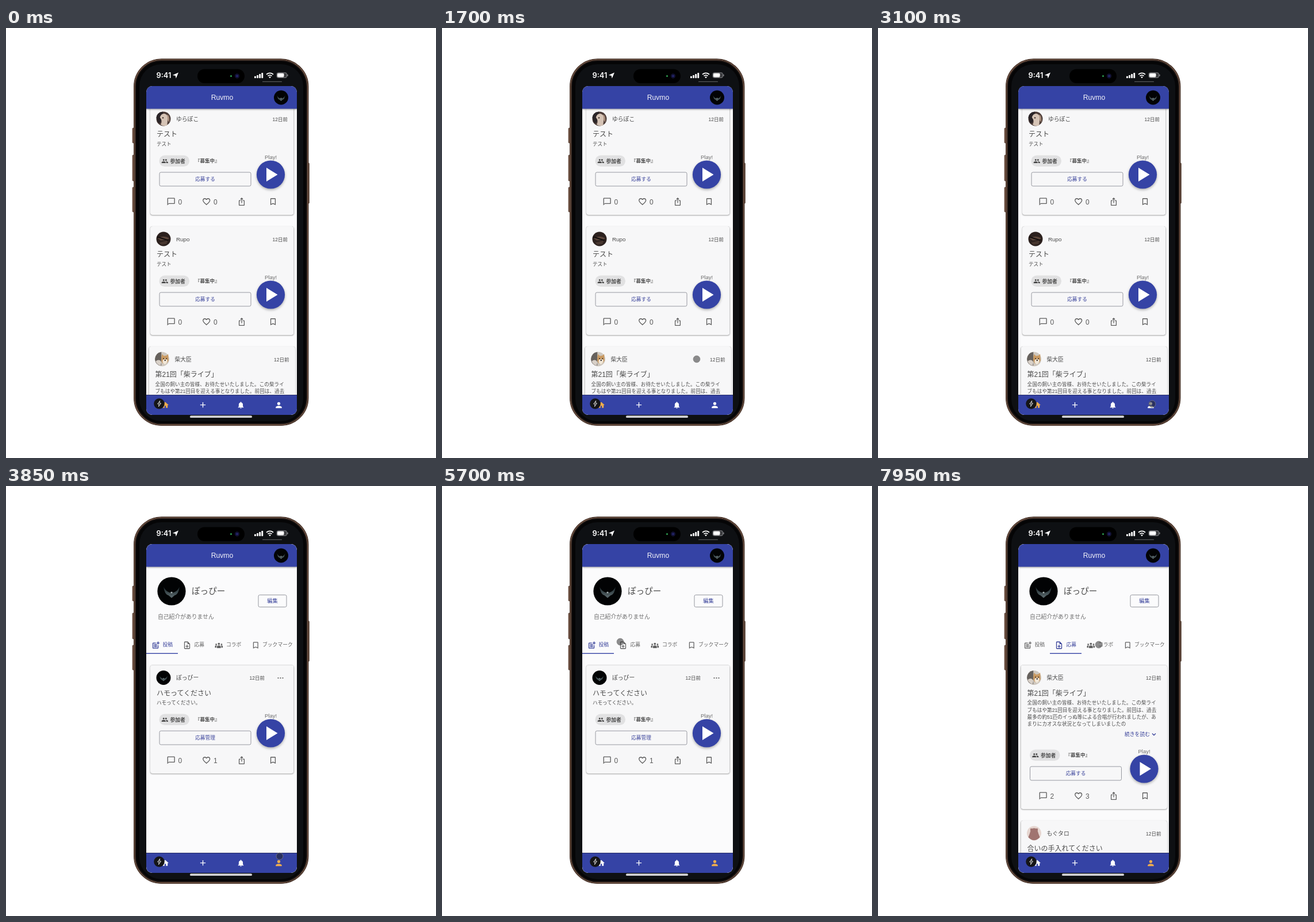
Recreate the animation shown at these times as an HTML page. Size 748 by 748 pixels, loop 8 s.

```html
<!DOCTYPE html>
<html lang="ja">
<head>
<meta charset="utf-8">
<title>Phone demo</title>
<style>
html, body { margin: 0; width: 100%; height: 100%; overflow: hidden; background: #fff; }
svg { display: block; width: 100vw; height: 100vh; }
text { font-family: "Liberation Sans", "Noto Sans CJK JP", sans-serif; white-space: pre; }
.home, .profile, .posts, .applied, .to-accent, .from-accent, .home-icon, .user-icon {
  animation: 8s step-end infinite;
}
.home { animation-name: leave-home; }
.profile { animation-name: enter-profile; }
.posts { animation-name: leave-posts; }
.applied { animation-name: enter-applied; }
.from-accent { animation-name: tab-off; }
.to-accent { animation-name: tab-on; }
.home-icon { animation-name: home-off; }
.user-icon { animation-name: user-on; }
.bar { animation: slide 8s linear infinite; }
.pointer { animation: point 8s ease-in-out infinite; }
.card { filter: drop-shadow(0 0 .7px rgba(0,0,0,.35)) drop-shadow(0 1px 1.2px rgba(0,0,0,.36)); }
.play { filter: drop-shadow(0 2px 2px rgba(0,0,0,.3)); }
.head { filter: drop-shadow(0 1px 1.5px rgba(0,0,0,.4)); }
@keyframes leave-home { 0% { visibility: visible } 41.9%, 100% { visibility: hidden } }
@keyframes enter-profile { 0% { opacity: 0 } 41.9%, 100% { opacity: 1 } }
@keyframes leave-posts { 0% { visibility: visible } 78.8%, 100% { visibility: hidden } }
@keyframes enter-applied { 0% { visibility: hidden } 78.8%, 100% { visibility: visible } }
@keyframes tab-off { 0% { color: #39429a } 78.8%, 100% { color: #636363 } }
@keyframes tab-on { 0% { color: #636363 } 78.8%, 100% { color: #39429a } }
@keyframes home-off { 0% { color: #f0ad4e } 41.9%, 100% { color: #fff } }
@keyframes user-on { 0% { color: #fff } 41.9%, 100% { color: #f0ad4e } }
@keyframes slide {
  0% { transform: none }
  78.8% { transform: none; animation-timing-function: cubic-bezier(.4,0,.2,1) }
  82.6%, 100% { transform: translateX(55px) }
}
@keyframes point {
  0%, 18.5% { transform: translate(441px,566px); opacity: 0 }
  19.8% { transform: translate(442px,571px); opacity: 1 }
  21.25% { transform: translate(443px,576px) }
  32% { transform: translate(475px,651px) }
  37%, 42% { transform: translate(477px,654px) }
  48.1%, 66.9% { transform: translate(476px,644px) }
  71.25% { transform: translate(310px,271px) }
  76.25%, 87% { transform: translate(324px,275px) }
  95.5%, 100% { transform: translate(384px,276px); opacity: 1 }
}
</style>
</head>
<body>
<svg id="stage" viewBox="0 0 748 748"></svg>
<script>
const BLUE = '#3543a5', INK = '#39429a', GREY = '#5c5c5c', DARK = '#4a4a4a';

const ICON = {
  chat: 'M20 2H4c-1.1 0-2 .9-2 2v18l4-4h14c1.1 0 2-.9 2-2V4c0-1.1-.9-2-2-2zm0 14H6l-2 2V4h16v12z',
  heart: 'M16.5 3c-1.74 0-3.41.81-4.5 2.09C10.91 3.81 9.24 3 7.5 3 4.42 3 2 5.42 2 8.5c0 3.78 3.4 6.86 8.55 11.54L12 21.35l1.45-1.32C18.6 15.36 22 12.28 22 8.5 22 5.42 19.58 3 16.5 3zm-4.4 15.55l-.1.1-.1-.1C7.14 14.24 4 11.39 4 8.5 4 6.5 5.5 5 7.5 5c1.54 0 3.04.99 3.57 2.36h1.87C13.46 5.99 14.96 5 16.5 5c2 0 3.5 1.5 3.5 3.5 0 2.89-3.14 5.74-7.9 10.05z',
  share: 'M16 5l-1.42 1.42-1.59-1.59V16h-1.98V4.83L9.42 6.42 8 5l4-4 4 4zm4 5v11c0 1.1-.9 2-2 2H6c-1.11 0-2-.9-2-2V10c0-1.11.89-2 2-2h3v2H6v11h12V10h-3V8h3c1.1 0 2 .89 2 2z',
  mark: 'M17 3H7c-1.1 0-2 .9-2 2v16l7-3 7 3V5c0-1.1-.9-2-2-2zm0 15l-5-2.18L7 18V5h10v13z',
  pair: 'M16 11a3 3 0 1 0 0-6 3 3 0 0 0 0 6zM8 11a3 3 0 1 0 0-6 3 3 0 0 0 0 6zm0 2c-2.33 0-7 1.17-7 3.5V19h14v-2.5c0-2.33-4.67-3.5-7-3.5zm8 0-1 .05c1.16.84 2 1.97 2 3.45V19h6v-2.5c0-2.33-4.67-3.5-7-3.5z',
  crowd: 'M12 11a3 3 0 1 0 0-6 3 3 0 0 0 0 6zM4.5 12a2.3 2.3 0 1 0 0-4.6 2.3 2.3 0 0 0 0 4.6zM19.5 12a2.3 2.3 0 1 0 0-4.6 2.3 2.3 0 0 0 0 4.6zM6.5 20v-4c0-5 11-5 11 0v4zM1 19v-4q0-3 5-2.5-1 2-1 6.5zM23 19v-4q0-3-5-2.5 1 2 1 6.5z',
  post: 'M17 19H5V7h7V5H5c-1.1 0-2 .9-2 2v12c0 1.1.9 2 2 2h12c1.1 0 2-.9 2-2v-7h-2zM19 2h-2v3h-3v2h3v3h2V7h3V5h-3zM7 9h8v2H7zM7 12h8v2H7zM7 15h8v2H7z',
  file: 'M14 2H6c-1.1 0-2 .9-2 2v16c0 1.1.9 2 2 2h12c1.1 0 2-.9 2-2V8zm4 18H6V4h7v5h5zM11 11h2v3h3v2h-3v3h-2v-3H8v-2h3z',
  house: 'M10 20v-6h4v6h5v-8h3L12 3 2 12h3v8z',
  plus: 'M19 13h-6v6h-2v-6H5v-2h6V5h2v6h6z',
  bell: 'M12 22c1.1 0 2-.9 2-2h-4c0 1.1.89 2 2 2zm6-6v-5c0-3.07-1.64-5.64-4.5-6.32V4c0-.83-.67-1.5-1.5-1.5s-1.5.67-1.5 1.5v.68C7.63 5.36 6 7.92 6 11v5l-2 2v1h16v-1z',
  user: 'M12 12a4 4 0 1 0 0-8 4 4 0 0 0 0 8zm0 2c-2.67 0-8 1.34-8 4v2h16v-2c0-2.66-5.33-4-8-4z'
};

const rect = (x, y, w, h, r, fill, more = '') =>
  `<rect x="${x}" y="${y}" width="${w}" height="${h}" rx="${r}" fill="${fill}" ${more}/>`;
const circle = (x, y, r, fill, more = '') =>
  `<circle cx="${x}" cy="${y}" r="${r}" fill="${fill}" ${more}/>`;
const path = (d, fill, more = '') => `<path d="${d}" fill="${fill}" ${more}/>`;
const stroke = (color, width) => `stroke="${color}" stroke-width="${width}"`;
const icon = (name, x, y, s, fill = GREY) =>
  path(ICON[name], fill, `transform="translate(${x - 12 * s} ${y - 12 * s}) scale(${s})"`);
// y is the vertical middle of the line
const text = (s, x, y, size, fill = GREY, more = '') =>
  `<text x="${x}" y="${y + size * .38}" font-size="${size}" fill="${fill}" ${more}>${s}</text>`;
const MID = 'text-anchor="middle"', END = 'text-anchor="end"', BOLD = 'font-weight="700"';
const outline = (x, y, w, h) => rect(x, y, w, h, 2.5, 'none', stroke('#8c8e96', .9));

// Avatars live in a unit circle
const FACES = {
  pale: circle(0, 0, 1, '#4a3a36') + path('M-1-.2Q-.9-.9-.1-1L0-.3-.5.6-.8.5z', '#2a2427') +
    path('M-.5-.2Q-.3-.8.2-.7.7-.5.6 0L.5.9Q0 1.1-.4.8-.1.3-.5-.2z', '#d5c3b5') +
    path('M.5-.6Q.9-.5.8.5L.6.2z', '#a88d7c') + circle(-.08, -.15, .1, '#4b3c37'),
  dark: circle(0, 0, 1, '#2c211e') + path('M-.8-.1Q0-.6.8-.1L.5.1-.4.2z', '#5c463b') +
    path('M-.6.5L.6.2.4.7-.3.8z', '#47362f') + path('M-.9-.3L.7.2', 'none', stroke('#120e0d', .16)),
  shiba: circle(0, 0, 1, '#cfc8bf') + path('M-1 0Q-.9-.9-.1-1L-.1.9Q-.9.9-1 0z', '#66615d') +
    path('M-.9.3Q-.4-.1-.1.4L-.2.9Q-.7.8-.9.3z', '#d8d0c8') +
    path('M0-.7L.25-.45.6-.5.85-.7.9.2Q.6.8.1.6-.3.2 0-.7z', '#c99a62') +
    path('M.1.15Q.4-.2.75.15.7.7.3.7 0 .5.1.15z', '#f1e8da') +
    circle(.2, -.08, .08, '#332a26') + circle(.62, -.08, .08, '#332a26') + circle(.42, .15, .1, '#332a26'),
  brown: circle(0, 0, 1, '#e6d6d0') +
    path('M-.8.55Q-.6.1-.5-.3-.6-.8-.3-.65 0-.75.3-.65.6-.8.5-.3.6.1.8.55 0 1.4-.8.55z', '#a07470'),
  night: circle(0, 0, 1, '#020304') +
    path('M-.56-.3Q-.4.05-.1.1L0 .2.1.1Q.4.05.56-.3.5.25.2.3L0 .48-.2.3Q-.5.25-.56-.3z', 'url(#glow)') +
    circle(0, .1, .07, '#9aa6a8')
};
const avatar = (kind, x, y, r) => `<g transform="translate(${x} ${y}) scale(${r})">${FACES[kind]}</g>`;

function card(top, height, o) {
  const d = o.wide ? 2.5 : 0, left = 262 - d, right = 490 + d, low = top + height;
  const body = o.body.map((line, i) =>
    text(line, left, top + 65.7 + i * 12.1, 8.55, DARK, o.wide ? 'letter-spacing=".08"' : ''));
  const more = o.body.length > 2
    ? text('続きを読む', 429, top + 120.5, 8.8, INK) +
      path(`M477 ${top + 119}l3 3 3-3`, 'none', stroke(INK, 1.3)) : '';
  const dots = o.menu ? [473.5, 477.5, 481.5].map(x => circle(x, top + 22.5, 1.1, GREY)).join('') : '';
  return `<g class="card">${rect(251 - d, top, 249.5 + 2 * d, height, 4, '#f7f7f8')}</g>` +
    avatar(o.face, 274 - d, top + 22, 12.5) +
    text(o.name, 296 - d, top + 22, 9.8, DARK) +
    text('12日前', o.menu ? 450 : right, top + 22.7, 8.5, DARK, END) + dots +
    text(o.title, left, top + 48.6, 12, DARK) + body.join('') + more +
    rect(266.5 - d, low - 103.5, 52.5, 19.5, 9.7, '#e1e1e2') +
    icon('pair', 276.3 - d, low - 93.5, .51, DARK) +
    text('参加者', 285.5 - d, low - 93.8, 8.8, DARK, BOLD) +
    text('『募集中』', 329 - d, low - 93.8, 8.5, DARK, BOLD) +
    outline(267 - d, low - 74, 159, 24) +
    text(o.action, 346.5 - d, low - 62.2, 8.7, INK, MID) +
    text('Play!', 460.5 + d, low - 100.5, 9.5, '#6c6c6c', MID) +
    `<g class="play">${circle(460.5 + d, low - 70, 24.6, BLUE)}</g>` +
    path(`M${453 + d} ${low - 82}v24l19.5-12z`, '#fff') +
    icon('chat', 287.2, low - 23, .66) + text(o.chats, 299.5, low - 23, 12) +
    icon('heart', 348.7, low - 23, .66) + text(o.likes, 361, low - 23, 12) +
    icon('share', 410, low - 23, .63) + icon('mark', 464.5, low - 23, .66);
}

const test = { title: 'テスト', body: ['テスト'], action: '応募する', chats: 0, likes: 0 };
const dog = {
  wide: true, face: 'shiba', name: '柴大臣', title: '第21回「柴ライブ」', action: '応募する', chats: 2, likes: 3,
  body: ['全国の飼い主の皆様、お待たせいたしました。この柴ライ', 'ブもはや第21回目を迎える事となりました。前回は、過去',
    '最多の約51匹のイっぬ等による合唱が行われましたが、あ', 'まりにカオスな状況となってしまいましたの']
};
const bear = { ...test, wide: true, face: 'brown', name: 'もぐタロ', title: '合いの手入れてください', body: [] };
const USER = 'ぽっぴー';
const own = {
  face: 'night', name: USER, title: 'ハモってください', body: ['ハモってください。'],
  action: '応募管理', chats: 0, likes: 1, menu: true
};

const page = rect(244, 101, 262, 572, 0, '#fbfbfc');
const tab = (cls, name, x, label, lx, s = .64) =>
  `<g class="${cls}" color="#636363">${icon(name, x, 277, s, 'currentColor')}${text(label, lx, 276, 8.8, 'currentColor')}</g>`;

const home = '<g class="home">' +
  card(136, 189, { ...test, face: 'pale', name: 'ゆらぽこ' }) +
  card(345, 189, { ...test, face: 'dark', name: 'Rupo' }) +
  card(554, 250.5, dog) + '</g>';

const profile = `<g class="profile">${page}` +
  avatar('night', 288, 183, 24.6) + text(USER, 323, 182, 14.6, DARK) +
  outline(439, 189.5, 49, 21) + text('編集', 463.5, 200, 9.2, INK, MID) +
  text('自己紹介がありません', 264, 227, 9.8, '#6c6c6c') +
  tab('from-accent', 'post', 260.7, '投稿', 272.5) + tab('to-accent', 'file', 315, '応募', 327.5) +
  tab('', 'crowd', 370.3, 'コラボ', 383, .62) + tab('', 'mark', 434.3, 'ブックマーク', 446) +
  `<g class="bar">${rect(244, 290.6, 55, 1.4, 0, BLUE)}</g>` +
  `<g class="posts">${card(311.5, 188.5, own)}</g>` +
  `<g class="applied">${card(311.5, 250.5, dog)}${card(582, 190, bear)}</g></g>`;

const header = `<g class="head">${rect(244, 101, 262, 39.5, 0, BLUE)}</g>` +
  text('Ruvmo', 376, 120.3, 12.2, '#f4f4fa', MID) + avatar('night', 478.5, 121, 12.5);

const nav = rect(244, 638.5, 262, 35, 0, BLUE) + path('M244 638.5h262', 'none', stroke('#252d68', 1)) +
  `<g class="home-icon">${icon('house', 277, 656, .6, 'currentColor')}</g>` +
  icon('plus', 342.5, 655.7, .66, '#fff') + icon('bell', 408.5, 656, .6, '#fff') +
  `<g class="user-icon">${icon('user', 474.5, 656, .66, 'currentColor')}</g>` +
  circle(266.5, 653.5, 9.3, '#151517') +
  path('M267.7 648.5l-4 5.5h2.6l-.8 4.5 4-5.7h-2.6z', 'none', stroke('#eee', .9));

const key = (x, y, h) => rect(x, y, 3, h, 1, '#7d5c4a', stroke('#3a2820', .6));
const phone = key(220, 174, 26) + key(220, 221, 45) + key(220, 277, 43) + key(524.5, 235, 70) +
  rect(222.6, 53.9, 303.3, 637.5, 48, '#0d0a09', stroke('#49342a', 1.2)) +
  rect(224, 55.3, 300.5, 634.7, 46.6, '#050506', stroke('#80604e', 1.3)) +
  rect(225.6, 56.9, 297.3, 631.5, 45, '#050506', stroke('#241b18', 1.2)) +
  rect(232, 63, 285, 621, 38, '#0e1013') +
  rect(333, 71.5, 82, 24.5, 12.2, '#000') +
  circle(391.5, 83.7, 1.4, '#35b45a') + circle(402, 83.5, 4.2, '#10102f') + circle(402, 83.5, 2, '#24246a');

const bars = [0, 1, 2, 3].map(i => rect(432 + i * 4.1, 83.8 - i * 1.9, 2.9, 3.4 + i * 1.9, .7, '#fff')).join('');
const wifi = [[6, 80.7], [3.6, 83.4]].map(([w, y]) =>
  path(`M${459 - w} ${y}q${w} ${-w * .75} ${2 * w} 0`, 'none', stroke('#fff', 1.8))).join('') +
  path('M459 87.5l-2-2.3q2-1.6 4 0z', '#fff');
const status = '<text x="261.5" y="87.3" font-size="12.8" font-weight="600" fill="#fff" style="font-family:Inter,sans-serif">9:41</text>' +
  path('M300 77.5l-4.3 10.3-1-4.9-5-1z', '#fff') + bars + wifi +
  rect(471, 77.8, 17.5, 8.7, 2.6, '#3a3b3e', stroke('#8b8c8f', .9)) +
  rect(472, 78.8, 11.5, 6.7, 1.7, '#fff') + rect(489.3, 80.5, 1.3, 3.4, .6, '#8b8c8f') +
  rect(446, 92.7, 34, 1.3, .6, '#55575a') + rect(320, 674.3, 108, 3.8, 1.9, '#d2d2d4');

const pointer = `<g class="pointer">${circle(0, 0, 5.9, 'rgba(30,30,30,.5)', stroke('rgba(125,125,125,.75)', 1))}</g>`;

document.getElementById('stage').innerHTML =
  `<defs><clipPath id="screen">${rect(244, 101, 262, 572, 10.5, '#000')}</clipPath>
  <linearGradient id="glow" x1="0" x2="0" y1="0" y2="1"><stop stop-color="#1b282c"/><stop offset="1" stop-color="#5f6d71"/></linearGradient></defs>` +
  phone + status + `<g clip-path="url(#screen)">${page}${home}${profile}${header}${nav}</g>` + pointer;
</script>
</body>
</html>
```
